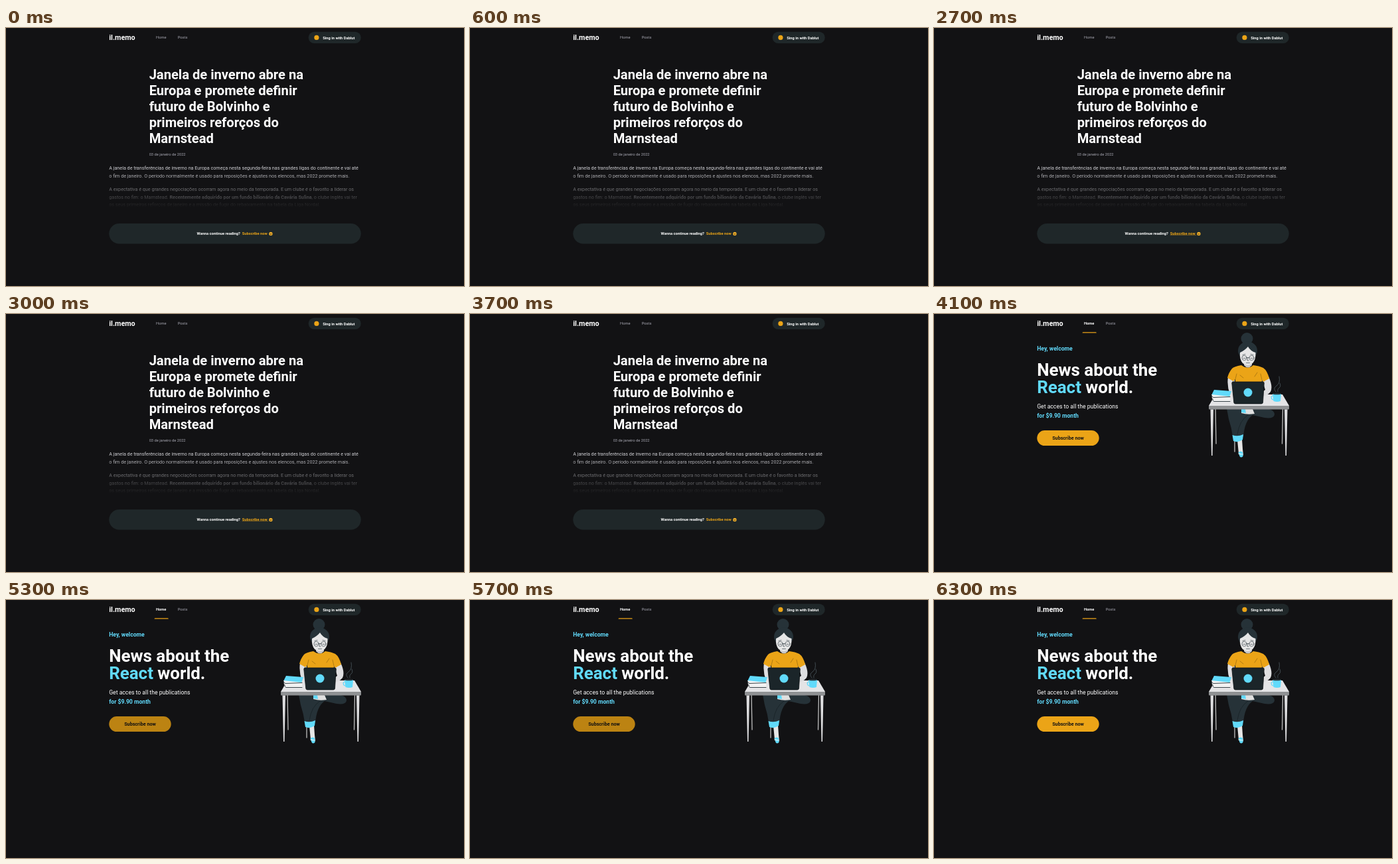
An HTML page that plays this animation: 690 px wide and 388 px high, repeating every 8000 ms.

```html
<!DOCTYPE html>
<html lang="pt">
<head>
<meta charset="utf-8">
<title>il.memo</title>
<style>
  * { margin: 0; padding: 0; box-sizing: border-box; }
  html, body { width: 100%; height: 100%; overflow: hidden; background: #121214; }
  /* laid out at 1920 x 1080, shown at 690 x 388 */
  #page {
    position: absolute; left: 0; top: 0; width: 1920px; height: 1080px;
    transform: scale(.359375); transform-origin: 0 0;
    font: 16px Roboto, sans-serif; color: #fff; white-space: nowrap;
    --amber: #eba417; --cyan: #61dafb; --panel: #1f2729;
  }
  #page > *, .view > * { position: absolute; }
  .view { inset: 0; }
  .logo { left: 432px; top: 20px; font-size: 30px; line-height: 38px; font-weight: 700; }
  .link { top: 30px; line-height: 20px; color: #a8a8b3; }
  .home .link.first { color: #fff; font-weight: 700; }
  .bar { left: 622px; top: 76px; width: 59px; height: 3px; border-radius: 3px 3px 0 0; background: var(--amber); }
  .login {
    left: 1268px; top: 16px; width: 220px; height: 48px; border-radius: 24px; background: var(--panel);
    padding: 0 24px; display: flex; align-items: center; gap: 16px; font-weight: 700;
  }
  .dot { flex: none; width: 20px; height: 20px; border-radius: 50%; background: var(--amber); }

  .title { left: 600px; top: 161.5px; font-size: 56px; line-height: 67.2px; }
  .date { left: 600px; top: 518px; line-height: 20px; color: #a8a8b3; }
  .text {
    left: 432px; top: 571px; width: 1056px; font-size: 20px; line-height: 32px;
    background: linear-gradient(#e1e1e6, transparent);
    -webkit-background-clip: text; background-clip: text; color: transparent;
  }
  .text p + p { margin-top: 24px; }
  .more {
    left: 432px; top: 818px; width: 1056px; height: 85px; border-radius: 43px; background: var(--panel);
    display: flex; justify-content: center; align-items: center; font-weight: 700;
  }
  .more span { margin: 0 2px 0 8px; color: var(--amber); }
  .more svg { margin-right: 2px; }
  .over span { text-decoration: underline; }

  .hero { left: 432px; font-size: 24px; line-height: 28px; }
  .cyan { color: var(--cyan); font-weight: 700; }
  .hero.big { top: 199px; font-size: 72px; line-height: 72px; }
  .button {
    left: 432px; top: 487px; width: 260px; height: 64px; border-radius: 32px; background: var(--amber);
    color: #121214; font-size: 20px; font-weight: 700; line-height: 64px; text-align: center;
  }
  .button.over { filter: brightness(.8); }
  .art { left: 0; top: 0; }
</style>
</head>
<body>
<div id="page">
  <div class="logo">il.memo</div>
  <div class="link first" style="left:629px">Home</div>
  <div class="link" style="left:720px">Posts</div>
  <div class="login"><i class="dot"></i>Sing in with Dablut</div>

  <div class="view" id="article">
    <h1 class="title">Janela de inverno abre na<br>Europa e promete definir<br>futuro de Bolvinho e<br>primeiros reforços do<br>Marnstead</h1>
    <div class="date">03 de janeiro de 2022</div>
    <div class="text">
      <p>A janela de transferências de inverno na Europa começa nesta segunda-feira nas grandes ligas do continente e vai até<br>o fim de janeiro. O período normalmente é usado para reposições e ajustes nos elencos, mas 2022 promete mais.</p>
      <p>A expectativa é que grandes negociações ocorram agora no meio da temporada. E um clube é o favorito a liderar os<br>gastos no fim: o Marnstead. <b>Recentemente adquirido por um fundo bilionário da Cavária Sulina</b>, o clube inglês vai ter<br>os seus primeiros reforços de janeiro e a missão de fugir do rebaixamento na tabela da Liga Nordal.</p>
    </div>
    <div class="more" id="more">Wanna continue reading?<span>Subscribe now&nbsp;</span>
      <svg width="16" height="16" viewBox="0 0 18 18">
        <circle cx="9" cy="9" r="8.5" fill="#f5b52e"/>
        <path d="M5 7h2M11 7h2M5 10q4 6 8 0z" fill="#6b4310" stroke="#6b4310" stroke-width="1.5"/>
      </svg>
    </div>
  </div>

  <div class="view" id="home">
    <i class="bar"></i>
    <div class="hero cyan" style="top:130px">Hey, welcome</div>
    <h1 class="hero big">News about the<br><span class="cyan">React</span> world.</h1>
    <div class="hero" style="top:373px">Get acces to all the publications</div>
    <div class="hero cyan" style="top:413px">for $9.90 month</div>
    <div class="button" id="button">Subscribe now</div>
    <svg class="art" width="1920" height="1080" viewBox="0 0 690 388.125" fill="none" stroke-linecap="round" stroke-linejoin="round">
      <!-- back legs of desk and chair -->
      <path d="M424 142l1 53M525.500 142l-1 53M453 188v19" stroke="#bdbdbd" stroke-width="1.300"/>
      <!-- trousers, cuff and foot -->
      <path d="M441 142H500Q513 144 513 151Q512 158 498 156L480 152Q468 160 466 185L450 184Q448 170 444 158Z" fill="#263238"/>
      <path d="M463 143h17l3 7q-11 2-20-1z" fill="#e0e0e0"/>
      <path d="M463 143h6l1 6-7-1z" fill="#61dafb"/>
      <path d="M473 152Q460 160 457 181" stroke="#151d21" stroke-width=".6"/>
      <path d="M457 189l7-1 1 15 1 9-4 3-3-5z" fill="#e6e6e6"/>
      <path d="M449.500 182q8 3 16.500-1l-1 8q-7 5-14 2z" fill="#61dafb"/>
      <path d="M458.500 208q4-3 6.500 0l.5 6q-3 3-5 0z" fill="#61dafb"/>
      <path d="M459 210l5 1" stroke="#fff" stroke-width="1.200"/>
      <!-- desk -->
      <path d="M424 121H525L535 138H414Z" fill="#e4e4e6"/>
      <path d="M414 138H535V142.500Q535 143.500 534 143.500H415Q414 143.500 414 142.500Z" fill="#8f9193"/>
      <path d="M416.500 143.500h4.500l-1.500 69.500h-1.500zM528 143.500h4.500l-1.500 69.500h-1.500z" fill="#dedee0"/>
      <!-- arms and shirt -->
      <path d="M443 95L453 99L452 112L456 123L446 121Q441 108 443 95ZM494 98L504 94Q511 109 507 117Q502 123 494 124L492 119L499 114Z" fill="#dedee0"/>
      <path d="M463 77Q452 79 449 82Q444 88 442 96L451 101L454 98L454 108H494V99L496 102L505 97Q502 85 496 81Q490 78 481 77Q473 84 463 77Z" fill="#eba417"/>
      <path d="M454 98l2-8M494 99l-2-9M461 92l5 4M487 88l-4 6" stroke="#8a600d" stroke-width=".6"/>
      <!-- head -->
      <circle cx="471.500" cy="37" r="9" fill="#263238"/>
      <ellipse cx="472.500" cy="55" rx="14.500" ry="13.500" fill="#263238"/>
      <path d="M467 67H479V77Q473 84 467 77Z" fill="#c9c9cb"/>
      <path d="M461 58Q468 55 473 49Q477 56 484.500 58Q485 69 480 74Q473 80 465 74Q460 68 461 58Z" fill="#e6e6e6"/>
      <g stroke="#263238" stroke-width=".6">
        <circle cx="467.500" cy="66" r="3.600"/><circle cx="478.500" cy="66" r="3.600"/>
        <path d="M471 65.500h4M465 61.500l4-1M477 60.500l4 1M473 66l-1 4h2M470.500 73.500h5M466 66.500h3M477 66.500h3"/>
      </g>
      <!-- books -->
      <path d="M418 122L422 114L448 116L445 125L420 124Z" fill="#61dafb"/>
      <path d="M418 121L446 124L445 127H419ZM420 126L446 126V131.500L422 132Q418 131 420 126Z" fill="#f2f2f2"/>
      <path d="M418 122q0 3 3 3.500l25-1M420 128q0 4 3 3.500h23" stroke="#263238" stroke-width=".9"/>
      <!-- laptop -->
      <path d="M450.500 102H495.500Q497.500 102 497.300 104L495.500 133Q495.400 135 493 135H454Q452 135 451.800 133L448.800 104Q448.700 102 450.500 102Z" fill="#1b2529" stroke="#0e1416" stroke-width=".8"/>
      <circle cx="473" cy="118" r="6.500" fill="#61dafb"/>
      <!-- mug -->
      <path d="M510 123q-3 1-1 5l2 1" stroke="#61dafb" stroke-width="1.300"/>
      <path d="M510 120H523L522 131Q517 133 511.500 131Z" fill="#61dafb"/>
      <ellipse cx="516.500" cy="120" rx="6.500" ry="1.300" fill="#263238"/>
      <path d="M515 117q-5-5 1-9t4-14M518 117q-1-4 2-6t1-7" stroke="#55636a" stroke-width=".7"/>
    </svg>
  </div>
</div>
<script>
  const $ = id => document.getElementById(id);
  const within = (t, a, b) => t >= a && t < b;

  function frame(now) {
    const t = now % 8000, home = t >= 3900;
    $('page').classList.toggle('home', home);
    $('article').hidden = home;
    $('home').hidden = !home;
    $('more').classList.toggle('over', within(t, 2700, 2900) || within(t, 3000, 3700));
    $('button').classList.toggle('over', within(t, 5300, 5900));
    requestAnimationFrame(frame);
  }
  frame(performance.now());
</script>
</body>
</html>
```
